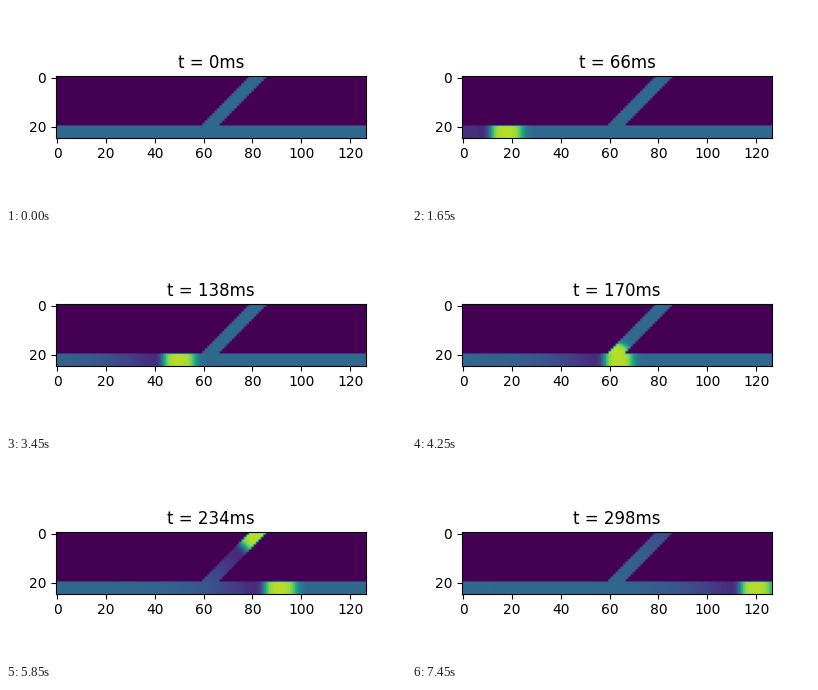
A matplotlib script for the animation above (7.5 s loop, 400x200 px).

```python
import numpy as np
import matplotlib.pyplot as plt
from matplotlib.animation import FuncAnimation

ROWS, COLS = 25, 127
CABLE_TOP = 20             # first row of the main cable
FRAMES, INTERVAL = 150, 50
SPEED = 0.896              # cells per frame
REST, PEAK = 0.34, 0.89
PULSE = 12.9               # cells between front and back of the pulse
STIM = 5.5                 # stimulated cells at the left end

y, x = np.mgrid[:ROWS, :COLS].astype(float)
cable = y >= CABLE_TOP
branch = ~cable & (x + y >= 79) & (x + y <= 85)
tissue = cable | branch


def sigmoid(v):
    return 1 / (1 + np.exp(-np.clip(v, -50, 50)))


def path_length():
    """Distance the pulse covers before it reaches each cell."""
    along = 64.4 + (x - y - 42) / np.sqrt(2)
    w = np.clip((CABLE_TOP - y) / 5, 0, 1)
    # the pulse loses a little time at the fork
    main = x + 1.6 * sigmoid((x - 66) / 2)
    return np.where(branch, (1 - w) * main + w * (along + 1.6), main)


dist = path_length()
start = np.where(x < STIM, 1.0, dist)
stop = np.where(x < STIM, 4.5, dist)


def potential(n):
    front = 13.4 + SPEED * (n - 21)
    back = front - PULSE - stop
    rise = sigmoid((front - start) / 1.05)
    fall = sigmoid(back / 0.9)
    dip = 0.25 * np.exp(-(np.maximum(back, 0) / 22) ** 1.3)
    up = REST + (PEAK - REST) * rise
    v = up * (1 - fall) + (REST - dip) * fall
    return np.where(tissue, v, 0)


fig, ax = plt.subplots(figsize=(4, 2), dpi=100)
image = ax.imshow(potential(0), vmin=0, vmax=1, cmap="viridis")
title = ax.set_title("t = 0ms")


def update(n):
    image.set_data(potential(n))
    title.set_text(f"t = {2 * n}ms")
    return image, title


anim = FuncAnimation(fig, update, frames=FRAMES, interval=INTERVAL,
                     repeat=True, repeat_delay=0, blit=False)
plt.show()
```
